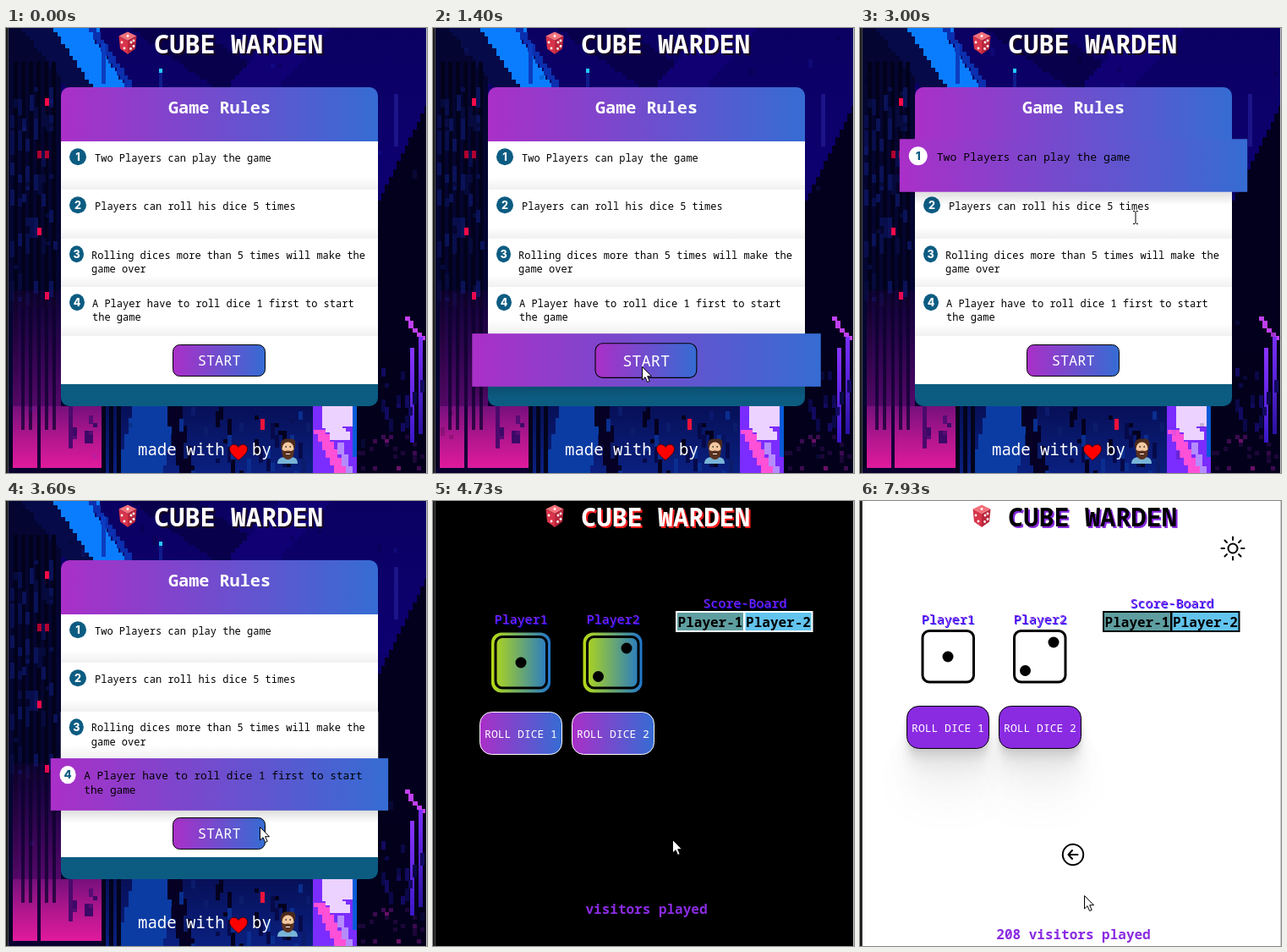
Write an HTML page with a canvas that moves like this. It is 498 by 526 pixels and loops after 8000 ms.

```html
<!DOCTYPE html>
<html lang="en">
<head>
<meta charset="utf-8">
<title>Dice game</title>
<style>
  html, body { margin: 0; width: 100%; height: 100%; overflow: hidden; background: #000; }
  #stage { position: absolute; left: 0; top: 0; width: 498px; height: 526px; overflow: hidden; }
  #stage > * { position: absolute; left: 0; top: 0; }
  #stage > .shade {
    top: 242px; width: 98px; height: 51px; border-radius: 14px;
    box-shadow: 0 2.8px 2.2px rgba(0,0,0,.034), 0 6.7px 5.3px rgba(0,0,0,.048),
      0 12.5px 10px rgba(0,0,0,.06), 0 22.3px 17.9px rgba(0,0,0,.05),
      0 41.8px 33.4px rgba(0,0,0,.04), 0 60px 60px rgba(0,0,0,.04);
  }
  text { font-family: "Roboto Mono", "Noto Sans Mono", "DejaVu Sans Mono", monospace; white-space: pre; }
  .num { font: 800 12.5px Inter, sans-serif; text-anchor: middle; }
</style>
</head>
<body>
<div id="stage">
  <canvas id="city" width="498" height="526"></canvas>
  <div class="shade" style="left:55px"></div>
  <div class="shade" style="left:164px"></div>
  <svg id="art" width="498" height="526" viewBox="0 0 498 526"></svg>
</div>
<script>
const LOOP = 8000, STEP = 200 / 3;
const GROW = 300, LAG = 130;            // hover transition, and how far the page trails the cursor
const CITY_STOPS = 64;                  // last animated step of the backdrop
const GAME = 4520, CONTROLS = 4790, COUNT = 4860, LIGHT = 6260;
const TITLE = 'CUBE WARDEN';
const $ = id => document.getElementById(id);
const clamp = v => Math.max(0, Math.min(1, v));
const smooth = u => u * u * (3 - 2 * u);

function random(seed) {
  return () => {
    seed = (seed * 1664525 + 1013904223) >>> 0;
    return seed / 4294967296;
  };
}

// ---- pixel city ----
const ctx = $('city').getContext('2d');
const CELL = 4.67;
const snap = v => Math.round(Math.round(v / CELL) * CELL);

function box(x, y, w, h, fill) {
  ctx.fillStyle = fill;
  ctx.fillRect(x, y, w, h);
}
function scatter(rnd, n, x, y, w, h, tall, fills) {
  for (let i = 0; i < n; i++) {
    box(snap(x + rnd() * (w - CELL)), snap(y + rnd() * h), 5,
      Math.ceil(CELL * (1 + Math.floor(rnd() * tall))), fills[Math.floor(rnd() * fills.length)]);
  }
}
// Stepped band whose left edge runs from (x0, y0) to (x1, y1)
function stairs(x0, y0, x1, y1, width, fill) {
  for (let y = y0; y < y1; y += CELL) {
    box(snap(x0 + (x1 - x0) * (y - y0) / (y1 - y0)), Math.round(y), width, 5, fill);
  }
}
function fade(x, y, w, h, ...colors) {
  const g = ctx.createLinearGradient(0, y, 0, y + h);
  colors.forEach((c, i) => g.addColorStop(i / (colors.length - 1), c));
  box(x, y, w, h, g);
}

function paintCity(step) {
  const rnd = random(11), flicker = random(step * 977 + 5);
  fade(0, 0, 498, 526, '#0b0062', '#0d0070', '#06003c', '#03001f');

  // sky and lit tower at the top
  stairs(150, 0, 250, 70, 80, '#08004a');
  stairs(320, 0, 260, 70, 60, '#100074');
  box(3, 0, 62, 447, '#040530');
  stairs(20, 0, 75, 70, 50, '#060a48');
  stairs(58, 0, 104, 70, 40, '#0a7dff');
  box(75, 0, 36, 12, '#0a7dff');
  stairs(98, 0, 145, 70, 9, '#0b2fae');
  box(113, 18, 5, 48, '#0c3cc0');
  box(181, 48, 4, 5, '#25c8ff');
  box(181, 53, 4, 17, '#101c8c');

  // left towers
  for (let x = 9; x < 62; x += 9) {
    box(x, 40, 5, 480, '#02021c');
    scatter(rnd, 9, x - 5, 70, 10, 250, 5, ['#080e4c', '#0a1258', '#060a3c']);
  }
  for (const [x, y] of [[46, 83], [37, 145], [46, 145], [37, 236], [46, 312]]) {
    box(x, y, 5, 9, y === 145 ? '#b00030' : '#ff0a48');
  }
  fade(8, 310, 57, 137, 'rgba(90,0,120,.1)', 'rgba(120,10,130,.7)');
  fade(8, 447, 105, 73, '#76107c', '#b0168e', '#e01a9c');
  for (const x of [18, 27, 37, 46, 55]) box(x, 330, 4, 145, 'rgba(12,0,50,.75)');
  box(37, 447, 4, 73, '#160038');
  box(74, 447, 5, 50, '#4a0a6c');
  scatter(rnd, 10, 80, 455, 30, 30, 2, ['#3c0a66', '#560c74']);
  box(3, 520, 110, 6, '#0a0030');

  // middle towers
  fade(113, 447, 252, 79, '#071058', '#0a2080');
  stairs(150, 447, 130, 526, 55, '#0b3ca4');
  stairs(190, 447, 205, 526, 18, '#050024');
  for (let x = 113; x < 135; x += 9) box(x, 447, 5, 79, '#03041c');
  scatter(rnd, 45, 205, 447, 155, 75, 4, ['#04001f', '#0a2e90', '#0c1c6c', '#060a4a']);
  box(301, 462, 5, 13, '#f0123c');

  // figure on the right
  box(363, 447, 52, 79, '#7b2cff');
  stairs(375, 447, 372, 468, 36, '#ecd2ff');
  stairs(374, 468, 386, 484, 24, '#ecd2ff');
  stairs(365, 475, 392, 526, 14, '#ff50d8');
  stairs(390, 490, 402, 526, 8, '#b58cff');
  box(410, 447, 5, 60, '#0a5ad8');

  // right edge
  box(415, 380, 82, 146, '#03001c');
  stairs(497, 92, 440, 205, 60, '#03001e');
  box(440, 205, 57, 180, '#03001e');
  box(459, 78, 5, 62, '#1c1488');
  stairs(470, 341, 494, 368, 6, '#c040f0');
  fade(478, 378, 5, 112, '#8a34ff', '#3a18c8');
  fade(488, 365, 5, 115, '#7a30ff', '#2a12a0');
  scatter(rnd, 14, 440, 400, 56, 70, 3, ['#0a0848', '#120a60']);
  scatter(rnd, 22, 415, 480, 80, 40, 1, ['#3c0a50', '#6a1068', '#1c0638']);

  scatter(flicker, 40, 3, 0, 494, 515, 2, ['rgba(40,70,230,.12)', 'rgba(0,0,20,.16)']);
}

// ---- vector parts ----
const rect = (x, y, w, h, attrs) => `<rect x="${x}" y="${y}" width="${w}" height="${h}" ${attrs}/>`;
const text = (x, y, size, fill, str, more = '') =>
  `<text x="${x}" y="${y}" font-size="${size}" fill="${fill}" ${more}>${str}</text>`;
const BOLD = 'font-weight="700"', MID = 'text-anchor="middle"';
const TEAL = '#0c5c82', VIOLET = '#8a2be2';

const defs = `<defs>
  <linearGradient id="main"><stop stop-color="#aa2fc8"/><stop offset="1" stop-color="#356cd3"/></linearGradient>
  <linearGradient id="lime"><stop stop-color="#b6da14"/><stop offset="1" stop-color="#2076cc"/></linearGradient>
  <linearGradient id="soft" x2="0" y2="1"><stop stop-opacity="0"/><stop offset="1" stop-opacity=".055"/></linearGradient>
  <linearGradient id="drop" x2="0" y2="1"><stop stop-opacity=".13"/><stop offset="1" stop-opacity="0"/></linearGradient>
</defs>`;

const pips = [[144, 9.5], [137, 17], [140, 24], [148, 17], [151, 15], [147.5, 24.5], [151, 21.5]]
  .map(([x, y]) => `<circle cx="${x}" cy="${y}" r="1.4" fill="#fff"/>`).join('');
const titleArt = `
  <path d="M144 4.500 154.500 9.500 144 15 133.500 9.500Z" fill="#f2727c"/>
  <path d="M133.500 9.500 144 15V31L135 24.500Z" fill="#d8344a"/>
  <path d="M154.500 9.500 144 15V31L153 24.500Z" fill="#b9263c"/>${pips}
  ${text(177, 31.5, 30.3, '#000', TITLE, `id="titleShade" ${BOLD}`)}
  ${text(175, 30, 30.3, '#fff', TITLE, `id="titleText" ${BOLD}`)}`;

const rules = [
  [85, 10, 105, 'Two Players can play the game'],
  [85, 10, 105, 'Players can roll his dice 5 times'],
  [83.5, 8.5, 101, 'Rolling dices more than 5 times will make the', 'game over'],
  [84, 9, 102, 'A Player have to roll dice 1 first to start', 'the game'],
];
const rowTop = i => Math.round(134 + i * 57.4);
function row(i) {
  const y = rowTop(i), h = rowTop(i + 1) - y, rule = rules[i];
  const inner = rule
    ? `<ellipse class="disc" cx="${rule[0]}" cy="${y + 18.3}" rx="${rule[1]}" ry="10"/>` +
      `<text class="num" x="${rule[0]}" y="${y + 22.8}">${i + 1}</text>` +
      rule.slice(3).map((line, n) => text(rule[2], y + 23.5 + n * 16, 12, '#000', line)).join('')
    : rect(197.5, 374.5, 109, 37, 'rx="8" fill="url(#main)" stroke="#000"') +
      text(252.2, 399, 17, '#fff', 'START', MID);
  return `<g id="row${i}">
    ${i ? rect(65, y - 15, 375, 15, 'fill="url(#soft)"') : ''}
    ${rect(65, y + h, 375, 14, 'class="under" fill="url(#drop)"')}
    ${rect(65, y, 375, h, 'class="back"')}${inner}</g>`;
}

const menuArt = `<g id="menu">
  <path d="M65 134V80a10 10 0 0 1 10-10H430a10 10 0 0 1 10 10V134Z" fill="url(#main)"/>
  ${text(252.5, 101, 20.2, '#fff', 'Game Rules', `${BOLD} ${MID}`)}
  <path d="M65 421H440V437a10 10 0 0 1-10 10H75a10 10 0 0 1-10-10Z" fill="${TEAL}"/>
  <g id="rows">${[0, 1, 2, 3, 4].map(row).join('')}</g>
  ${text(156, 505, 19, '#fff', 'made with')}
  <path d="M275 511C268 505 264.500 502 264.500 497.500C264.500 491.500 272 490.500 275 495.500C278 490.500 285.500 491.500 285.500 497.500C285.500 502 282 505 275 511Z" fill="#f00" stroke="#300" stroke-width=".8"/>
  ${text(291, 505, 19, '#fff', 'by')}
  <path d="M321 515C321 508 326 507 333.500 507S345 508 345 515Z" fill="#78b4d8"/>
  <path d="M326 498C322 487 330 484 335 486C342 484 344 490 341 498Z" fill="#4a2a1c"/>
  <ellipse cx="333.500" cy="497.500" rx="7" ry="8" fill="#f4c8a0"/>
  <path d="M326.500 498C329 501 331 499.500 333.500 499.500S338 501 340.500 498C341.500 507 337 510 333.500 510S325.500 507 326.500 498Z" fill="#5a3220"/>
  <path d="M330.500 495h1.500M335.500 495h1.500" stroke="#222" stroke-width="1.500"/>
  <path d="M331 503.500h5" stroke="#fff"/></g>`;

const double = (x, y, str) => text(x + 1, y + 1, 15, '#00f', str) + text(x, y, 15, VIOLET, str, 'font-weight="500"');
const pip = (x, y) => `<circle cx="${x}" cy="${y}" r="6.500"/>`;
const die = (x, dots) => rect(x - 35, 148.5, 70, 71, 'class="neon" rx="12" fill="url(#lime)"') +
  rect(x - 30, 153.5, 60.5, 60.5, 'rx="8" fill="none" stroke="#000" stroke-width="3"') +
  dots.map(([dx, dy]) => pip(x + dx, 184 + dy)).join('');
const rollButton = (x, n) => rect(x + .5, 242.5, 97, 50, 'class="roll" rx="14"') +
  text(x + 49, 273, 13, '#fff', 'ROLL DICE ' + n, MID);
const scoreCell = (x, fill, str) => rect(x, 131, 80, 23, `class="cell" fill="${fill}" stroke-width="2"`) +
  text(x + 40, 149, 16, '#000', str, `${BOLD} ${MID}`);
const rays = Array.from({ length: 8 }, (_, i) =>
  `<path d="M451 56h3.500" transform="rotate(${i * 45} 441 56)"/>`).join('');

const gameArt = `<g id="game">
  ${double(72.5, 145, 'Player1')}${double(181.5, 145, 'Player2')}${double(319.3, 126, 'Score-Board')}
  ${scoreCell(288, '#5f9ea0', 'Player-1')}${scoreCell(368.5, '#62c4ee', 'Player-2')}
  <g id="play">${die(104, [[0, 0]])}${die(212.5, [[16.5, -17], [-17, 16.5]])}
  ${rollButton(55, 1)}${rollButton(164, 2)}</g>
  <g id="controls" fill="none" stroke-width="2" stroke-linecap="round" stroke-linejoin="round">
    <circle cx="252" cy="418" r="12.200"/><path d="M257.500 418H246.500M251 413L246.500 418L251 423"/>
    <g id="sun"><circle cx="441" cy="56" r="5.500"/>${rays}</g>
    <path id="moon" d="M440 46A10 10 0 1 0 451 58A8 8 0 0 1 440 46Z"/></g>
  ${text(252.5, 518, 16, VIOLET, '', `id="visitors" ${BOLD} ${MID}`)}</g>`;

const frameArt = rect(0, 0, 3, 526, 'fill="#1b1b1d"') + rect(2, 0, 1, 526, 'fill="#4a4a4c"') +
  rect(497, 0, 1, 526, 'fill="#c8c8c8"');
const cursorArt = `<g id="cursor">
  <path id="arrow" d="M.5.500V16L4 12.700L6.600 18.500L9.200 17.400L6.700 11.700H11.500Z" fill="#fff" stroke="#000"/>
  <path id="beam" d="M-3-7.500H-1L0-6.500L1-7.500H3M0-6.500V6.500M-3 7.500H-1L0 6.500L1 7.500H3" fill="none" stroke="#000"/></g>`;
$('art').innerHTML = defs + menuArt + gameArt + titleArt + frameArt + cursorArt;

// ---- timeline ----
const path = [
  [600, 300, 522], [900, 247, 400], [1700, 247, 400], [1950, 290, 470], [2175, 330, 470],
  [2400, 349, 323], [2650, 340, 165], [2785, 335, 165], [3590, 300, 385], [4000, 300, 385],
  [4260, 283, 400], [5333, 283, 400], [5860, 485, 54], [7200, 485, 54], [7925, 265, 466], [LOOP, 265, 466],
];

function cursorAt(t) {
  const i = path.findIndex(p => p[0] > t);
  if (i < 1) return null;
  const [t0, x0, y0] = path[i - 1], [t1, x1, y1] = path[i];
  const k = (t - t0) / (t1 - t0);
  return [Math.round(x0 + (x1 - x0) * k), Math.round(y0 + (y1 - y0) * k)];
}
function hoveredRow(t) {
  const at = cursorAt(t - LAG);
  return at ? [0, 1, 2, 3, 4].findIndex(i => at[1] >= rowTop(i) && at[1] < rowTop(i + 1)) : -1;
}
// Progress of every row's hover transition at time t
function hoverProgress(t) {
  const dt = 10, progress = [0, 0, 0, 0, 0];
  for (let s = dt; s <= t; s += dt) {
    const over = hoveredRow(s);
    progress.forEach((u, i) => { progress[i] = clamp(u + (i === over ? dt : -dt) / GROW); });
  }
  return progress;
}

const show = (el, on) => { el.style.display = on ? '' : 'none'; };
const rowEls = [0, 1, 2, 3, 4].map(i => $('row' + i));
const each = (selector, fn) => document.querySelectorAll(selector).forEach(fn);

function drawRows(t) {
  const over = hoveredRow(t), progress = hoverProgress(t);
  const order = [0, 1, 2, 3, 4].sort((a, b) => progress[a] - progress[b] || a - b);
  for (const i of order) {
    const el = rowEls[i], lit = i === over, cy = (rowTop(i) + rowTop(i + 1)) / 2;
    const scale = 1 + smooth(progress[i]) / 10;
    el.setAttribute('transform', `translate(252.5 ${cy}) scale(${scale}) translate(-252.5 ${-cy})`);
    el.querySelector('.back').setAttribute('fill', lit ? 'url(#main)' : '#fff');
    show(el.querySelector('.under'), lit || progress[i] > 0);
    if (rules[i]) {
      el.querySelector('.disc').setAttribute('fill', lit ? '#fff' : TEAL);
      el.querySelector('.num').setAttribute('fill', lit ? TEAL : '#fff');
    }
    $('rows').appendChild(el);
  }
}

function drawGame(t, light) {
  const ink = light ? '#000' : '#fff';
  $('play').setAttribute('transform', `translate(0 ${light ? 0 : 7})`);
  each('.neon', el => show(el, !light));
  each('.cell', el => el.setAttribute('stroke', ink));
  each('.roll', el => {
    el.setAttribute('fill', light ? VIOLET : 'url(#main)');
    el.setAttribute('stroke', ink);
  });
  show($('controls'), t >= CONTROLS);
  $('controls').setAttribute('stroke', ink);
  show($('sun'), light);
  show($('moon'), !light);
  $('visitors').textContent = (t >= COUNT ? '208 ' : '') + 'visitors played';
  $('visitors').setAttribute('y', t >= CONTROLS ? 518 : 488);
}

function draw(step) {
  const t = step * STEP, game = t >= GAME, light = t >= LIGHT;
  show($('city'), !game);
  show($('menu'), !game);
  show($('game'), game);
  each('.shade', el => show(el, light));
  $('stage').style.background = light ? '#fff' : '#000';
  $('titleText').setAttribute('fill', light ? '#000' : '#fff');
  $('titleShade').setAttribute('fill', light ? VIOLET : game ? '#f21c1c' : '#1a0a20');
  if (game) drawGame(t, light);
  else {
    paintCity(Math.min(step, CITY_STOPS));
    drawRows(t);
  }

  const at = cursorAt(t), beam = at && !game && at[1] < 360;
  show($('cursor'), at);
  if (at) $('cursor').setAttribute('transform', `translate(${at})`);
  show($('beam'), beam);
  show($('arrow'), !beam);
}

let last = -1;
const start = performance.now();
function tick() {
  const t = (performance.now() - start) % LOOP;
  const step = Math.floor((t + 4) / STEP) % 120;
  if (step !== last) draw(last = step);
  requestAnimationFrame(tick);
}
tick();
</script>
</body>
</html>
```
